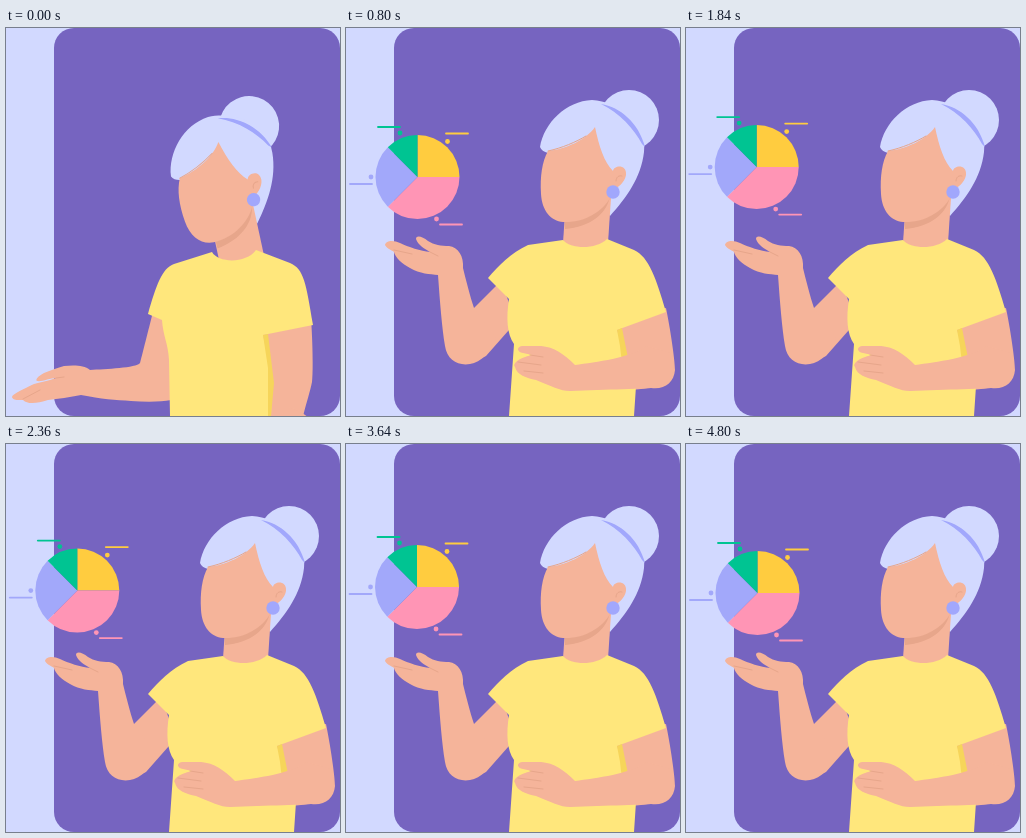
Write an HTML page with a canvas that moves like this. It is 334x388 px and loops after 4840 ms.

```html
<!DOCTYPE html>
<html lang="en">
<head>
<meta charset="utf-8">
<title>Presenter with pie chart</title>
<style>
html, body { margin: 0; width: 100%; height: 100%; overflow: hidden; background: #d2d9ff; }
canvas { display: block; width: 334px; height: 388px; }
</style>
</head>
<body>
<canvas id="stage"></canvas>
<script>
const LOOP = 4840;
const W = 334, H = 388;
const C = {
  back: '#d2d9ff', panel: '#7664c0', skin: '#f5b49a', shade: '#e7a68b',
  shirt: '#ffe77c', fold: '#f6d55a', hair: '#d2d9ff', band: '#a1a7fc',
  pink: '#ff95b5', gold: '#ffcc3f', green: '#00c492', violet: '#a2a8fa'
};

const canvas = document.getElementById('stage');
const dpr = window.devicePixelRatio || 1;
canvas.width = W * dpr;
canvas.height = H * dpr;
const ctx = canvas.getContext('2d');

const clamp = x => Math.min(1, Math.max(0, x));
const lerp = (a, b, p) => a + (b - a) * p;
const span = (t, start, length) => clamp((t - start) / length);
const easeInOut = x => x < .5 ? 4 * x ** 3 : 1 - 4 * (1 - x) ** 3;
const easeOut = x => 1 - (1 - x) ** 2;
const rad = deg => deg * Math.PI / 180;

function spin([x, y], deg) {
  const c = Math.cos(rad(deg)), s = Math.sin(rad(deg));
  return [x * c - y * s, x * s + y * c];
}

// Blends two paths with equal commands inside a frame that turns around a moving pivot.
function morph(a, b, { from = [0, 0], to = [0, 0], turn = 0 } = {}) {
  const cmds = b.match(/[A-Z]|-?[\d.]+/g);
  const nums = s => s.match(/-?[\d.]+/g).map(Number);
  const na = nums(a), nb = nums(b), pairs = [];
  for (let i = 0; i < nb.length; i += 2) {
    pairs.push([
      spin([na[i] - from[0], na[i + 1] - from[1]], turn),
      [nb[i] - to[0], nb[i + 1] - to[1]]
    ]);
  }
  return (p, lift = 0) => {
    const ox = lerp(from[0], to[0], p), oy = lerp(from[1], to[1], p);
    const flat = pairs.flatMap(([u, v]) => {
      const m = [lerp(u[0], v[0], p), lerp(u[1], v[1], p)];
      const [x, y] = spin(m, -turn * (1 - p));
      return [ox + x, oy + y - lift * clamp((Math.hypot(...m) - 75) / 55)];
    });
    let i = 0;
    return new Path2D(cmds.map(k => /[A-Z]/.test(k) ? k : flat[i++].toFixed(2)).join(' '));
  };
}

const elbow = { from: [150, 355], to: [118, 318] };

const forearm = morph(
  `M75 367 C95 371 110 372 125 373 C140 374 155 374 165 372 C172 368 174 355 168 335
   L134 335 C130 340 100 341 84 342 C78 337 68 337 58 338 C50 340 44 343 38 345
   C32 348 29 352 31 353 C36 354 44 350 50 350 C42 353 34 354 28 356
   C18 361 6 366 6 369 C7 373 14 372 17 372 C22 377 32 375 42 372 C52 371 64 369 75 367 Z`,
  `M92 247 C94 275 96 300 99 318 C101 332 112 338 124 336 C135 334 145 325 150 310
   L128 280 C124 268 120 252 117 240 C118 228 112 219 103 218 C95 218 88 217 82 213
   C76 208 70 207 70 211 C72 217 79 221 84 224 C75 223 62 219 54 215
   C48 212 40 212 39 217 C41 221 46 222 48 224 C49 229 56 236 64 240 C74 246 84 246 92 247 Z`,
  { ...elbow, turn: 70 });

const creases = morph(
  'M17 371 L34 362 M50 350 L58 349', 'M48 222 L66 226 M84 224 L92 228',
  { ...elbow, turn: 70 });

const upperArm = morph(
  'M148 280 L134 335 L140 365 L160 372 L168 365 L165 285 Z',
  'M155 253 L128 280 L112 322 L122 336 L140 328 L170 294 Z',
  { ...elbow, turn: 40 });

const farArm = morph(
  'M255 295 L305 290 C307 320 307 345 306 354 C304 364 300 376 296 392 L262 392 C262 350 258 330 255 295 Z',
  'M265 290 L320 280 C326 310 329 335 329 342 C328 355 318 362 305 360 L285 362 C279 340 270 320 265 290 Z');

const shirt = morph(
  `M206 224 C212 235 240 236 250 222 L284 235 C298 241 300 255 307 297 L257 307 L266 350 L265 388
   L164 388 L163 332 C162 315 157 308 156 292 L142 286 C150 258 156 240 168 236 Z`,
  `M217 212 C224 221 250 222 261 211 L288 222 C303 229 310 250 320 284 L271 302 L290 358 L288 388
   L163 388 L168 316 C161 306 160 290 163 271 L142 250 C152 238 165 225 182 217 Z`);

const fold = morph(
  'M257 307 L262 306 L268 355 L265 388 L262 388 L262 340 Z',
  'M271 302 L276 300 L282 330 L280 336 L276 335 L274 318 Z');

const bust = {
  hair: new Path2D(`M194 119 C198 95 220 73 246 72 C272 74 302 92 298 124
    C295 150 280 170 264 188 L240 150 L202 125 C198 124 195 122 194 119 Z`),
  band: new Path2D('M255 76 C274 79 293 95 299 119 L296 116 C288 101 274 85 255 76 Z'),
  neck: new Path2D('M266 155 L261 230 L216 230 L219 185 Z'),
  shade: new Path2D('M219 193 C240 192 257 181 264 168 C261 186 244 199 219 201 Z'),
  face: new Path2D(`M202 123 C220 121 240 112 249 99 C253 118 258 134 267 143
    C268 137 281 136 280 147 C279 154 272 160 266 162 L264 170 C256 184 238 195 217 194
    C205 193 196 183 195 166 C194 148 196 134 202 123 Z`),
  brow: new Path2D('M202 123 C216 120 230 114 240 108'),
  ear: new Path2D('M270 153 C270 149 273 147 276 148')
};

const restArm = new Path2D(`M300 318 C285 330 250 334 229 337 C218 326 208 319 195 318 L176 318
  C170 319 171 324 177 325 L186 327 C172 330 166 336 169 339 C171 347 180 350 190 352
  C205 358 214 363 224 363 C260 361 300 362 314 358 C328 354 330 340 326 325 Z`);
const restFingers = new Path2D('M184 327 L197 329 M172 334 L195 337 M178 343 L197 345');

// Slices run clockwise from the top, in degrees.
const slices = [[0, 90, C.gold], [90, 225, C.pink], [225, 315, C.violet], [315, 360, C.green]];

// Dot, line start, line direction, time the line begins to grow.
const labels = [
  { dot: [30, -35.5], line: [28.5, -43.5], dir: 1, at: 450, color: C.gold },
  { dot: [19, 42], line: [22.5, 47.5], dir: 1, at: 450, color: C.pink },
  { dot: [-46.5, 0], line: [-45.5, 7], dir: -1, at: 320, color: C.violet },
  { dot: [-17.5, -44], line: [-17.5, -50], dir: -1, at: 400, color: C.green }
];

function fill(path, color) {
  ctx.fillStyle = color;
  ctx.fill(path);
}

function line(path, color, width = 1) {
  ctx.strokeStyle = color;
  ctx.lineWidth = width;
  ctx.lineCap = 'round';
  ctx.stroke(path);
}

function disc(x, y, r, color) {
  ctx.fillStyle = color;
  ctx.beginPath();
  ctx.arc(x, y, r, 0, 2 * Math.PI);
  ctx.fill();
}

// Draws a rigid part whose pivot goes from a to b while it turns into place.
function rigid(a, b, turn, p, draw) {
  ctx.save();
  ctx.translate(lerp(a[0], b[0], p), lerp(a[1], b[1], p));
  ctx.rotate(rad(-turn * (1 - p)));
  ctx.translate(-b[0], -b[1]);
  draw();
  ctx.restore();
}

function drawHead() {
  disc(283, 92, 30, C.hair);
  fill(bust.hair, C.hair);
  fill(bust.band, C.band);
  fill(bust.neck, C.skin);
  fill(bust.shade, C.shade);
  fill(bust.face, C.skin);
  line(bust.brow, C.shade);
  line(bust.ear, C.shade);
  disc(267, 164, 6.7, C.band);
}

function drawPie(t) {
  const p = easeOut(span(t, 160, 540));
  if (!p) return;
  const drift = span(t, 1150, 2900) * 2;
  const rise = 5 * (1 - Math.cos(drift * 2 * Math.PI));
  ctx.save();
  ctx.translate(lerp(138, 71.5, p) - rise * .08, lerp(158, 149, p) - rise);
  ctx.rotate(rad(61 * (1 - p)));
  ctx.scale(p, p);
  for (const [a, b, color] of slices) {
    ctx.fillStyle = color;
    ctx.beginPath();
    ctx.moveTo(0, 0);
    ctx.arc(0, 0, 42, rad(a - 90), rad(b - 90));
    ctx.fill();
  }
  for (const { dot, line: [x, y], dir, at, color } of labels) {
    disc(...dot, 2.4, color);
    const grow = easeInOut(span(t, at, 240));
    if (!grow) continue;
    const stem = new Path2D();
    stem.moveTo(x, y);
    stem.lineTo(x + dir * 22 * grow, y);
    line(stem, color, 1.8);
  }
  ctx.restore();
}

function draw(t) {
  const p = easeInOut(span(t, 0, 600));
  const reach = 1 - (1 - p) ** 1.08;
  const lift = 175 * p ** 4 * (1 - p);

  ctx.setTransform(dpr, 0, 0, dpr, 0, 0);
  ctx.fillStyle = C.back;
  ctx.fillRect(0, 0, W, H);
  ctx.fillStyle = C.panel;
  ctx.beginPath();
  ctx.roundRect(48, 0, 286, 388, 20);
  ctx.fill();

  fill(upperArm(reach), C.skin);
  fill(forearm(reach, lift), C.skin);
  line(creases(reach, lift), C.shade);
  fill(farArm(p), C.skin);
  rigid([165, 148.5], [194, 119], 16, p, drawHead);
  fill(shirt(p), C.shirt);
  fill(fold(p), C.fold);
  rigid([291, 400], [312, 342], 60, p, () => {
    fill(restArm, C.skin);
    line(restFingers, C.shade);
  });
  drawPie(t);
}

const start = performance.now();
function tick() {
  draw((performance.now() - start) % LOOP);
  requestAnimationFrame(tick);
}
draw(0);
requestAnimationFrame(tick);
</script>
</body>
</html>
```
